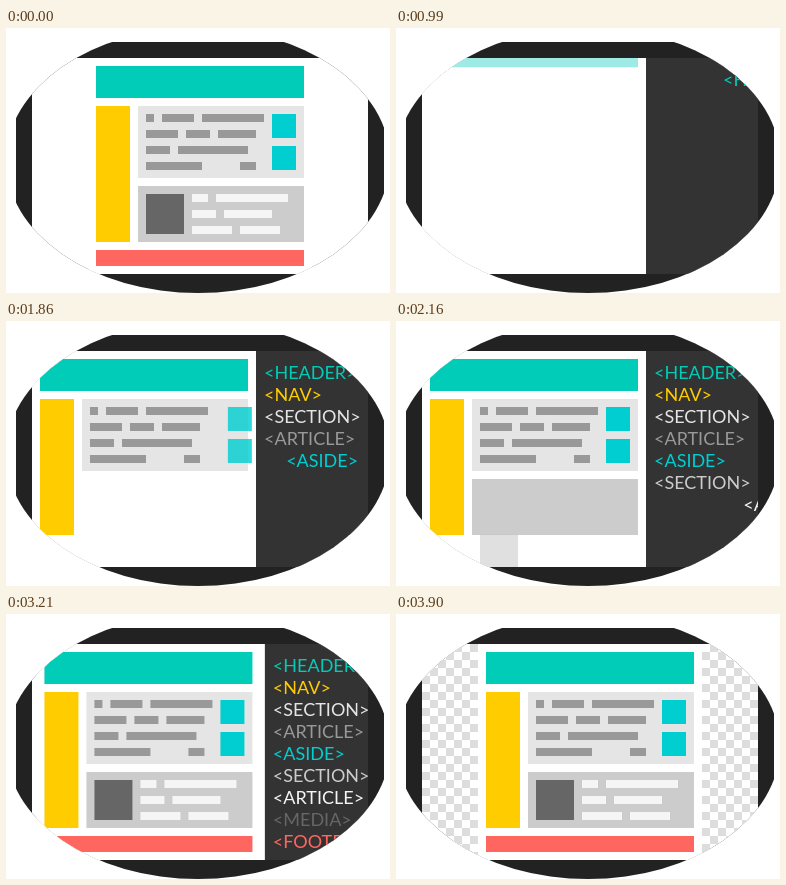
Recreate the animation shown at these times as an HTML page without scripts. Size 384 by 265 pixels, loop 5550 ms.

```html
<!DOCTYPE html>
<html lang="en">
<head>
<meta charset="utf-8">
<title>Page layout and its tags</title>
<style>
@property --t { syntax: "<number>"; inherits: true; initial-value: 0; }
@keyframes clock { to { --t: 5550; } }

html, body { margin: 0; width: 100%; height: 100%; overflow: hidden; background: #fff; }

/* --t is the loop time in ms; every pose below is computed from it */
svg {
  display: block; width: 100%; height: 100%;
  animation: clock 5550ms steps(185) -1ms infinite;
  --in: clamp(0, (var(--t) - 40) / 200, 1);
  --out: clamp(0, (var(--t) - 3177) / 417, 1);
  --shut: calc(1 - var(--in) + var(--out));
}
.page { transform: translateX(calc(var(--shut) * 56px)); }
.panel { transform: translateX(calc(var(--shut) * 112px)); }
.layout { opacity: max(1 - var(--in), clamp(0, var(--t) - 800, 1)); }
.checker { opacity: calc((clamp(0, var(--t) - 3749, 1) + clamp(0, var(--t) - 3899, 1)) / 2); }

/* items enter one after another, 200 ms apart */
.layout > g, text { --p: clamp(0, (var(--t) - 926 - var(--i) * 200) / 167, 1); }
.layout > g {
  --x: 0; --y: 0;
  --q: max(var(--p), clamp(0, 300 - var(--t), 1));
  opacity: var(--q);
  transform: translate(calc((1 - var(--q)) * var(--x) * 1px), calc((1 - var(--q)) * var(--y) * 1px));
}
text {
  font: 18px Lato, sans-serif;
  transform: translateX(calc((1 - var(--p)) * 112px));
}

.i0 { --i: 0; } .i1 { --i: 1; } .i2 { --i: 2; }
.i3 { --i: 3; } .i4 { --i: 4; } .i5 { --i: 5; }
.i6 { --i: 6; } .i7 { --i: 7; } .i8 { --i: 8; }

.layout > .top { --y: -60; }
.layout > .head { --y: -50; }
.layout > .bottom { --y: 60; }
.layout > .left { --x: -60; }
.layout > .right { --x: 60; }

.teal { fill: #00ccb8; }
.yellow { fill: #fc0; }
.pale { fill: #e5e5e5; }
.mid { fill: #999; }
.cyan { fill: #00ced1; }
.silver { fill: #ccc; }
.light { fill: #f5f5f5; }
.dark { fill: #666; }
.coral { fill: #ff6660; }
</style>
</head>
<body>
<svg viewBox="0 0 384 265">
  <defs>
    <clipPath id="oval"><ellipse cx="192" cy="132.5" rx="192" ry="132.5"/></clipPath>
    <clipPath id="screen"><path d="M26 30h336v216H26z"/></clipPath>
    <pattern id="check" x="26" y="30" width="16" height="16" patternUnits="userSpaceOnUse">
      <path fill="#ddd" d="M0 0h8v8H0zM8 8h8v8H8z"/>
    </pattern>
  </defs>

  <g clip-path="url(#oval)">
    <path fill="#222" d="M10 14h368v251H10z"/>
    <g clip-path="url(#screen)">
      <path fill="#fff" d="M26 30h336v216H26z"/>
      <path class="checker" fill="url(#check)" d="M26 30h336v216H26z"/>

      <g class="page">
        <path fill="#fff" d="M26 30h224v216H26z"/>
        <g class="layout">
          <g class="i0 head teal"><path d="M34 38h208v32H34z"/></g>
          <g class="i1 left yellow"><path d="M34 78h34v136H34z"/></g>
          <g class="i2 right pale"><path d="M76 78h166v72H76z"/></g>
          <g class="i3 top mid">
            <path d="M84 86h8v8h-8zM100 86h32v8h-32zM140 86h62v8h-62z"/>
            <path d="M84 102h32v8H84zM124 102h24v8h-24zM156 102h38v8h-38z"/>
            <path d="M84 118h24v8H84zM116 118h70v8h-70z"/>
            <path d="M84 134h56v8H84zM178 134h16v8h-16z"/>
          </g>
          <g class="i4 right cyan"><path d="M210 86h24v24h-24zM210 118h24v24h-24z"/></g>
          <g class="i5 right silver"><path d="M76 158h166v56H76z"/></g>
          <g class="i6 bottom dark"><path d="M84 166h38v40H84z"/></g>
          <g class="i7 right light">
            <path d="M130 166h16v8h-16zM154 166h72v8h-72z"/>
            <path d="M130 182h24v8h-24zM162 182h48v8h-48z"/>
            <path d="M130 198h40v8h-40zM178 198h40v8h-40z"/>
          </g>
          <g class="i8 bottom coral"><path d="M34 222h208v16H34z"/></g>
        </g>
      </g>

      <g class="panel">
        <path fill="#333" d="M250 30h112v216H250z"/>
        <text class="i0 teal" x="258" y="58">&lt;HEADER&gt;</text>
        <text class="i1 yellow" x="258" y="80">&lt;NAV&gt;</text>
        <text class="i2 pale" x="258" y="102">&lt;SECTION&gt;</text>
        <text class="i3 mid" x="258" y="124">&lt;ARTICLE&gt;</text>
        <text class="i4 cyan" x="258" y="146">&lt;ASIDE&gt;</text>
        <text class="i5 silver" x="258" y="168">&lt;SECTION&gt;</text>
        <text class="i6 light" x="258" y="190">&lt;ARTICLE&gt;</text>
        <text class="i7 dark" x="258" y="212">&lt;MEDIA&gt;</text>
        <text class="i8 coral" x="258" y="234">&lt;FOOTER&gt;</text>
      </g>
    </g>
  </g>
</svg>
</body>
</html>
```
